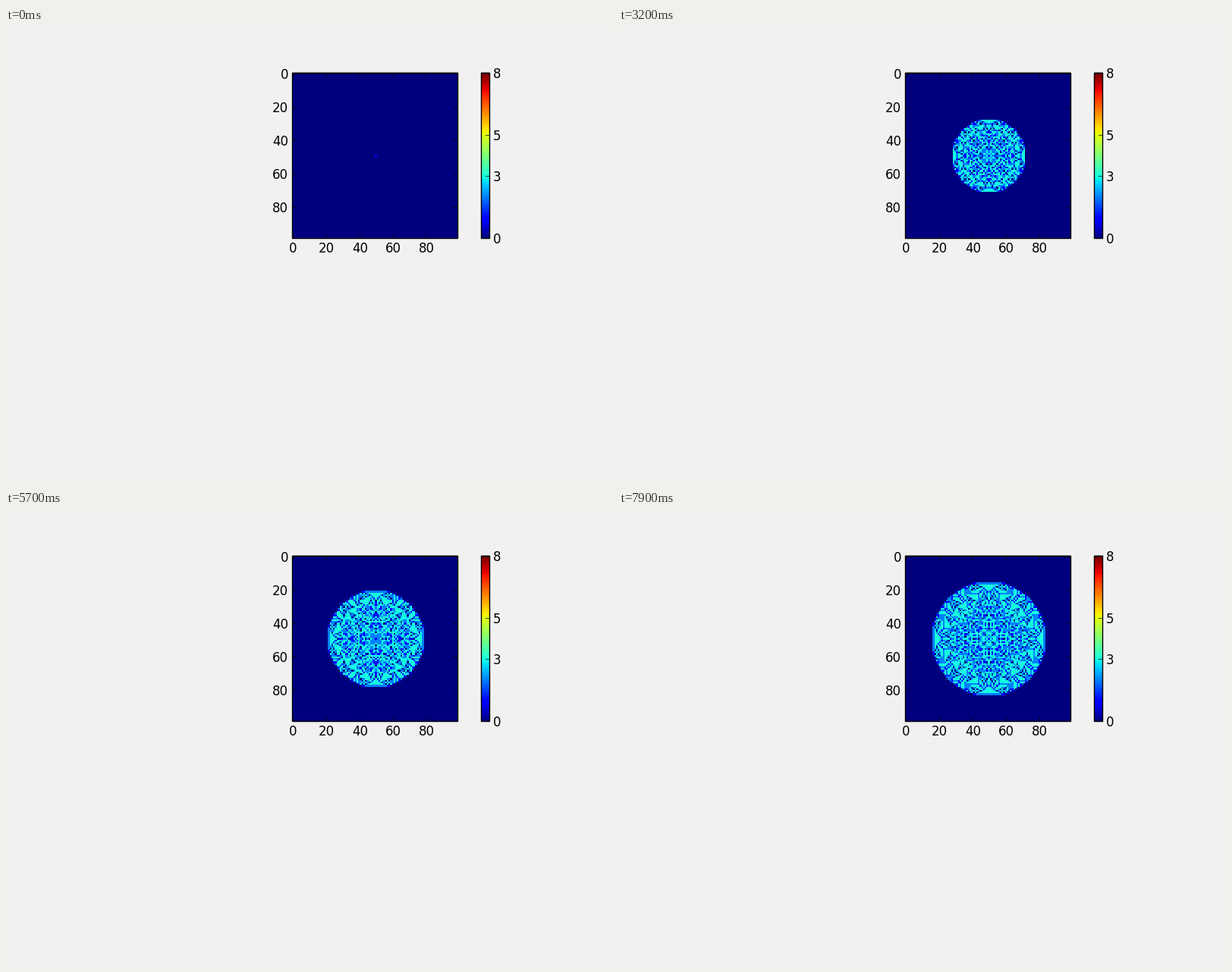
A matplotlib script that plays this animation: 800 px wide and 600 px high, repeating every 8 s.

```python
import numpy as np
import matplotlib.pyplot as plt
from matplotlib.animation import FuncAnimation

W, H, DPI = 800, 600, 100
FRAMES, STEP_MS = 80, 100
CELLS, GRAINS = 99, 100          # grid side, grains dropped per frame
SIDE = 219                       # pixels covered by the grid
LEFT, RIGHT, TOP, BOTTOM = 377.5, 595.5, 59.5, 277.5
BAR_L, BAR_R = 626.5, 637.5
TICK = 5.56
PT = 72 / DPI


def relax(pile):
    """Topple every cell holding four or more grains until all are stable."""
    while True:
        t = pile >> 2
        if not t.any():
            return
        pile &= 3
        pile[1:] += t[:-1]
        pile[:-1] += t[1:]
        pile[:, 1:] += t[:, :-1]
        pile[:, :-1] += t[:, 1:]


def grow():
    pile = np.zeros((CELLS, CELLS), np.int16)
    mid = CELLS // 2
    pile[mid, mid] = 1
    states = [pile.copy()]
    for _ in range(FRAMES - 1):
        pile[mid, mid] += GRAINS
        relax(pile)
        states.append(pile.copy())
    return states


states = grow()
cell = ((np.arange(SIDE) + 0.5) * CELLS / SIDE).astype(int)
rows, cols = np.ix_(cell[1:], cell[:-1])

fig = plt.figure(figsize=(W / DPI, H / DPI), dpi=DPI, facecolor="#f1f1f1")
scale = dict(cmap="jet", vmin=0, vmax=8, origin="upper", zorder=-1)
view = fig.figimage(states[0][rows, cols].astype(float), 378, 322, **scale)
ramp = np.linspace(8, 0, 218)[:, None] * np.ones((1, 11))
fig.figimage(ramp, 627, 322, **scale)

ax = fig.add_axes([0, 0, 1, 1])
ax.set(xlim=(0, W), ylim=(H, 0))
ax.axis("off")


def line(xs, ys, px):
    ax.plot(xs, ys, color="black", lw=px * PT, snap=False,
            solid_capstyle="butt", solid_joinstyle="miter")


def frame(x0, x1):
    line([x0, x1, x1, x0, x0, x1], [TOP, TOP, BOTTOM, BOTTOM, TOP, TOP], 1.39)


def label(x, y, value, ha):
    ax.text(x, y, str(value), ha=ha, va="baseline", fontsize=12,
            family="DejaVu Sans", color="black")


frame(LEFT, RIGHT)
frame(BAR_L, BAR_R)

for k in range(5):
    x, y = 378.5 + 44 * k, 60.5 + 44 * k
    line([x, x], [TOP, TOP + TICK], 0.69)
    line([x, x], [BOTTOM, BOTTOM - TICK], 0.69)
    line([LEFT, LEFT + TICK], [y, y], 0.69)
    line([RIGHT, RIGHT - TICK], [y, y], 0.69)
    label(x, 296, 20 * k, "center")
    label(372, y + 6.5, 20 * k, "right")

for v in (0, 3, 5, 8):
    y = np.floor(278.18 - 218.18 * v / 8 + 0.5) - 0.5
    line([BAR_R, BAR_R - TICK], [y, y], 0.69)
    label(642, y + 6.5, v, "left")


def update(i):
    view.set_data(states[i % FRAMES][rows, cols].astype(float))
    return [view]


anim = FuncAnimation(fig, update, frames=FRAMES, interval=STEP_MS,
                     repeat=True, repeat_delay=0, blit=False)
plt.show()
```
